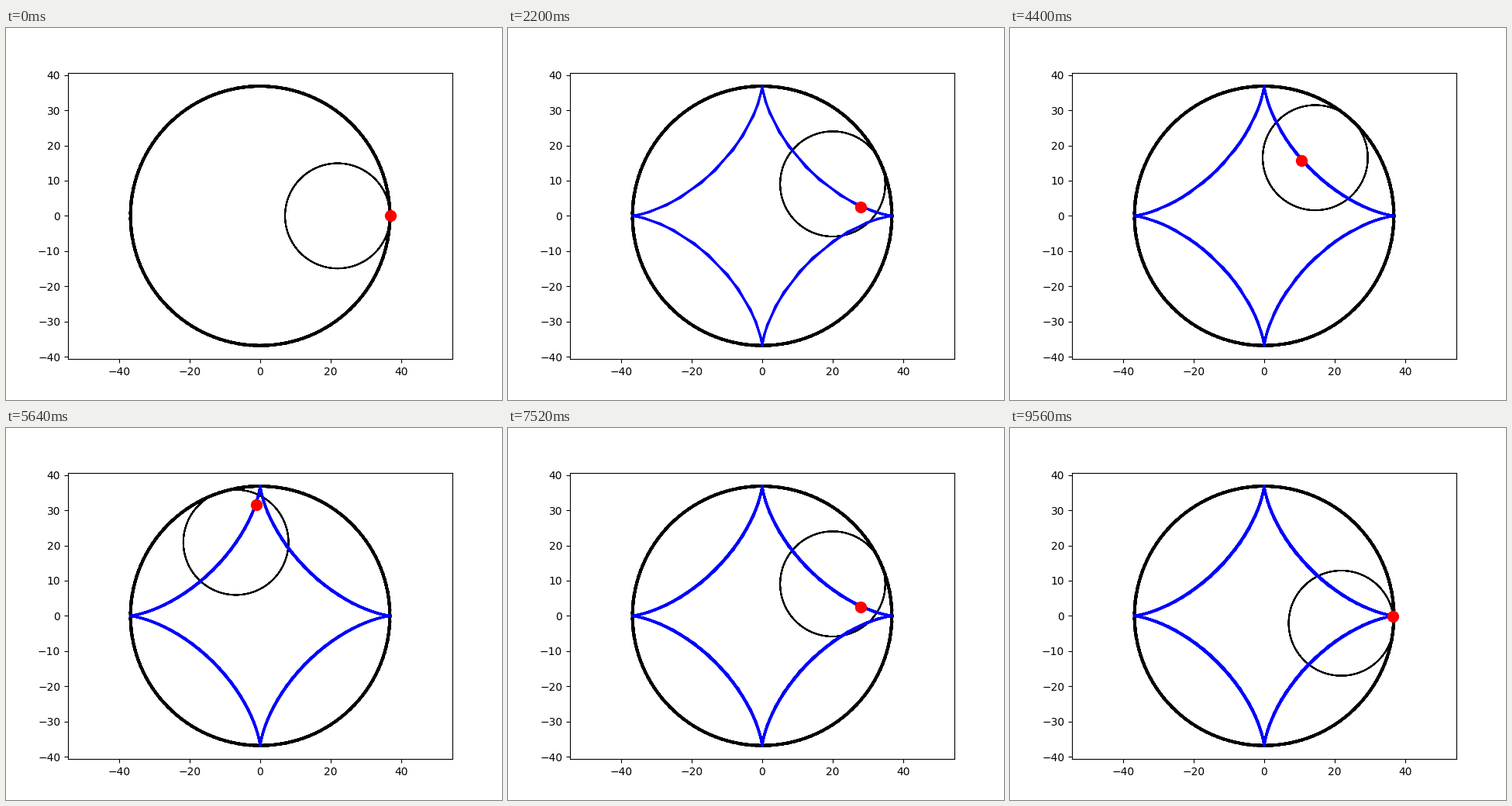
Animation of 640x480 px, one loop 9.6 s. Source, as a matplotlib script:

```python
import numpy as np
import matplotlib.pyplot as plt
from matplotlib.animation import FuncAnimation

OUTER = 37
INNER = 15
FRAMES = 240
INTERVAL = 40

# A coarse step over many turns, so each lap lands on new vertices.
theta = np.linspace(0, 2 * np.pi * INNER, 400)
cos, sin = np.cos(theta), np.sin(theta)
center_x, center_y = (OUTER - INNER) * cos, (OUTER - INNER) * sin
path_x, path_y = OUTER * cos**3, OUTER * sin**3

fig, ax = plt.subplots(figsize=(6.4, 4.8), dpi=100)
ax.plot(OUTER * cos, OUTER * sin, "k-", lw=2)
wheel, = ax.plot(center_x[0] + INNER * cos, center_y[0] + INNER * sin, "k-", lw=1)
trail, = ax.plot([], [], "b-", lw=2)
pen, = ax.plot([OUTER], [0], "ro", ms=10)
ax.axis("equal")


def update(i):
    wheel.set_data(center_x[i] + INNER * cos, center_y[i] + INNER * sin)
    trail.set_data(path_x[:i + 1], path_y[:i + 1])
    pen.set_data([path_x[i]], [path_y[i]])
    return wheel, trail, pen


anim = FuncAnimation(fig, update, frames=FRAMES, interval=INTERVAL,
                     repeat=True, repeat_delay=0)
plt.show()
```
